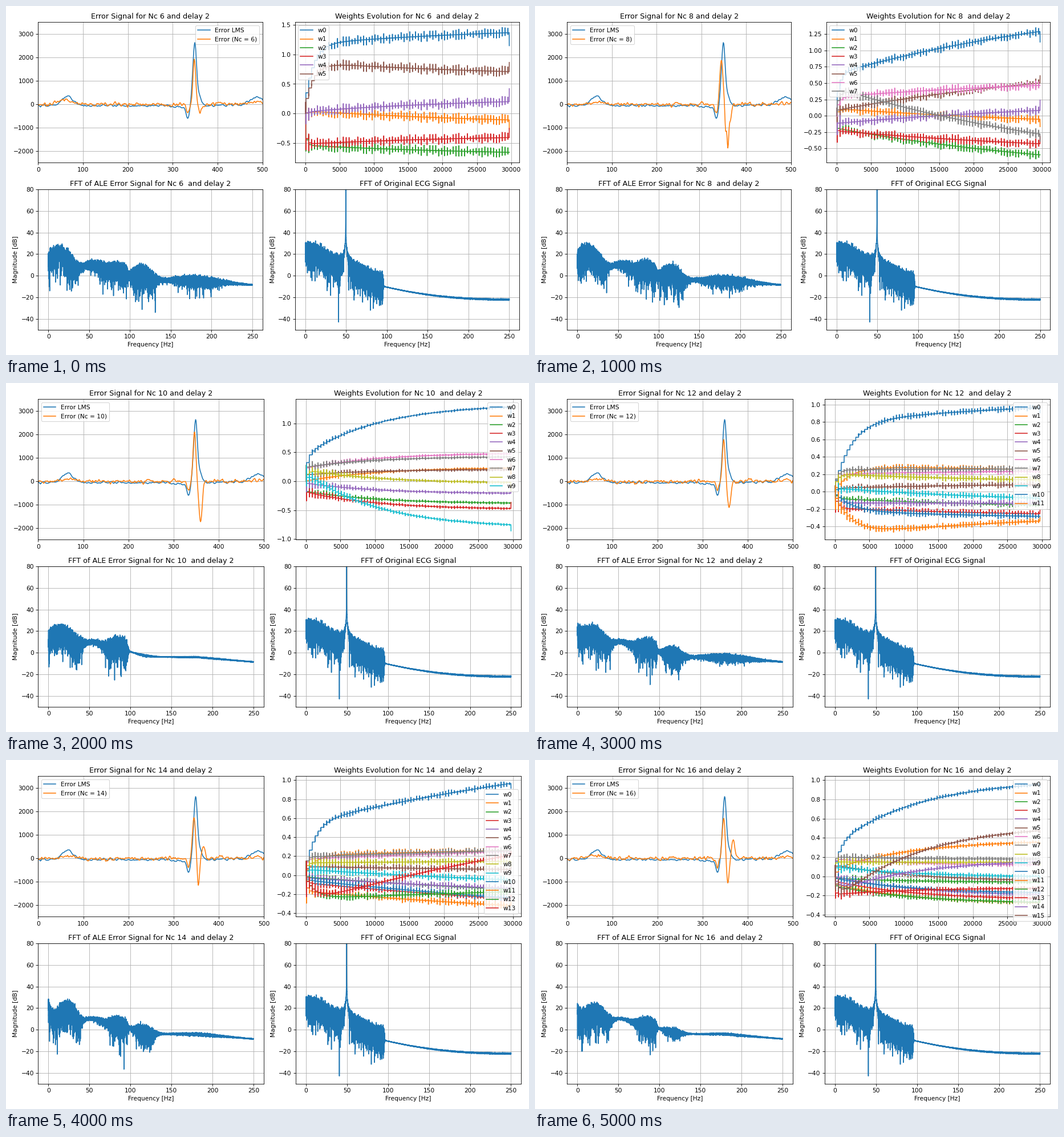
These frames come from a looping animation (917 px wide and 611 px high, 6 s). A matplotlib script:

```python
import numpy as np
import matplotlib.pyplot as plt
from matplotlib.animation import FuncAnimation

W, H, DPI = 917, 611, 76.4
N = 29730        # samples in the recording
BEAT = 421       # samples between heartbeats
X = np.arange(501)
FREQ = np.linspace(0, 250, 15001)

fig = plt.figure(figsize=((W + .01) / DPI, (H + .01) / DPI), dpi=DPI)
scenes = []


def scene(**kw):
    scenes.append(kw)


def bump(x, center, height, width):
    return height * np.exp(-((x - center) / width) ** 2)


def step(x, edge, width):
    """Soft switch from 0 to 1."""
    return .5 + .5 * np.tanh((x - edge) / (2 * width))


def ripple(seed, size, width):
    rng = np.random.default_rng(seed)
    kernel = bump(np.arange(-10, 11), 0, 1, width)
    y = np.convolve(rng.normal(size=540), kernel, "same")[20:521]
    return size * y / y.std()


def amp(db):
    return 10 ** (db / 20)


def spectrum(seed, steady, spread):
    """Magnitude in dB of a steady part plus complex noise."""
    rng = np.random.default_rng(seed)
    z = rng.normal(size=FREQ.size) + 1j * rng.normal(size=FREQ.size)
    return 20 * np.log10(np.abs(steady + spread * z / np.sqrt(2)) + 1e-4)


def ecg_spectrum():
    hum = 27 - 22 * np.log10(np.maximum(np.abs(FREQ - 49.6), .002))
    tail = -22 + 12 * ((250 - FREQ) / 153) ** 2.3
    noise = .6 + bump(FREQ, 0, 17, 26) + bump(FREQ, 45, 2, 25)
    noise = noise * (1 - step(FREQ, 95.5, .25)) + .004
    return spectrum(4, amp(np.where(FREQ > 97, tail, hum)), noise)


def ale_spectrum(s):
    steady = (6 - 10 * step(FREQ, 100, 10) + bump(FREQ, 52, 4.5, 15)
              - 4.5 * np.clip((FREQ - 180) / 70, 0, 1))
    hum, mid, high, far = s["bands"]
    noise = (bump(FREQ, *s["low"]) + s["dc"] * np.exp(-FREQ / 3) + bump(FREQ, 58, hum, 14)
             + bump(FREQ, 85, mid, 14) * (1 - step(FREQ, 97, .7))
             + bump(FREQ, 115, high, 13) + bump(FREQ, 180, far, 35) + .01)
    return spectrum(s["nc"], amp(steady), noise)


def weight_path(s, k):
    """Fast rise to one level, slow drift to the next, a kick at every beat."""
    nc = s["nc"]
    beats = np.arange(60, N - 100, BEAT)
    t = np.append(beats, N) - 60
    a, b = s["begin"][k] / 100, s["final"][k] / 100
    outer = k < 2 or k >= nc - 2
    fast = s["fast"] * (1 if outer else .2)
    drift = (1 - np.exp(-t / s["slow"])) / (1 - np.exp(-N / s["slow"]))
    value = a * (1 - np.exp(-t / fast)) + (b - a) * drift

    rng = np.random.default_rng(nc)
    first, last = s["kick"]
    size = last + (first - last) * np.exp(-beats / 7000)
    size = size * (1 + 2.5 * np.exp(-beats / 350))
    up, down = rng.uniform(.3, 1.1, (2, beats.size)) * size
    px = (beats[:, None] + [0, 6, 14, 24]).ravel()
    py = np.stack([value[:-1], value[:-1] + up, value[1:] - down, value[1:]], 1).ravel()
    end = b - s["end"] * np.cos(np.pi * k / 4)
    return np.append(px, [N - 10, N]), np.append(py, [b, end])


def lms_signal():
    y = -55 + bump(X, 65, 400, 17) + bump(X, 487, 370, 20) + bump(X, 322, -70, 25)
    y += bump(X, 333.5, -520, 5) + bump(X, 358, 400, 7)
    return y + bump(X, 349, 2600, np.where(X < 349, 6.3, 5.5)) + ripple(1, 24, 2.4)


def error_signal(s):
    y = -10 + bump(X, 62, s["wave"], 24) + bump(X, 485, .7 * s["wave"], 18)
    y += bump(X, 333, -370, 4.5) + bump(X, 403, 80, 6)
    for part in s["pulse"]:
        y += bump(X, *part)
    return y + ripple(7 + s["nc"] // 4, 36, 1.7)


scene(nc=6, left=(56.4, 506.9), width=393.4, ylim=(-.835, 1.548),
      places=("upper right", "upper left"), wave=170,
      pulse=[(348, 1980, 4.2), (360, -350, 3.5), (365, -150, 6)],
      low=(12, 12, 16), dc=0, bands=(1.3, 1.6, 1.4, .24),
      fast=1200, slow=30000, kick=(.085, .085), end=.22,
      begin=[117, 5, -54, -52, 3, 87],
      final=[137, -11, -66, -41, 20, 71])

scene(nc=8, left=(56.4, 511), width=392.4, ylim=(-.72, 1.434),
      places=("upper left", "upper left"), wave=70,
      pulse=[(344.5, 1900, 5), (354, -1050, 2.2), (359, -1850, 3), (365, -700, 3.5)],
      low=(12, 14, 15), dc=0, bands=(1.1, 2.2, 1.5, .24),
      fast=500, slow=40000, kick=(.07, .07), end=.16,
      begin=[64, 11, -19, -23, -12, 8, 29, 43],
      final=[129, -5.5, -60, -43, 8, 50, 46.5, -28])

scene(nc=10, left=(56.4, 507.9), width=395.5, ylim=(-1.007, 1.415),
      places=("upper left", "upper right"), wave=80,
      pulse=[(346.5, 2120, 4.4), (360, -1760, 5.2)],
      low=(14, 10, 18), dc=0, bands=(.5, 2.4, .05, .02),
      fast=400, slow=10500, kick=(.085, .02), end=.15,
      begin=[44, 0, -17, -18, -3, 11, 22, 24, 20, 16],
      final=[128, 22.5, -37.5, -47, -20.5, 20, 47.5, 42, -2, -75])

scene(nc=12, left=(56.4, 507.9), width=395.5, ylim=(-.5526, 1.0625),
      places=("upper left", "upper right"), wave=100,
      pulse=[(347, 1800, 4.2), (359, -1110, 5)],
      low=(16, 9.5, 17), dc=9, bands=(.5, 2, .7, .17),
      fast=2400, slow=30000, kick=(.045, .035), end=.06,
      begin=[79, 30, -8, -19, -13, 4, 20, 25, 20, 4, -22, -51],
      final=[96.5, 25.5, -15.5, -25.5, -13.5, 8, 23.5, 26, 13.5, -7.5, -28.5, -34])

scene(nc=14, left=(56.4, 507.9), width=395.5, ylim=(-.437, 1.042),
      places=("upper left", "lower right"), wave=100,
      pulse=[(345.5, 1750, 5), (355, -1150, 4), (366, 500, 5.5)],
      low=(22, 11, 12), dc=12, bands=(.5, 1.6, .6, .06),
      fast=1400, slow=60000, kick=(.05, .035), end=.05,
      begin=[55, 21, -2, -8, -3, 9, 17, 19, 13, 6, -5, -17, -25, -29],
      final=[96.5, 26, -15, -25, -14, 6, 25, 26, 14.5, -5, -24, -32, -17.5, 21])

scene(nc=16, left=(56.4, 507.9), width=395.5, ylim=(-.42, 1.042),
      places=("upper left", "upper right"), wave=110,
      pulse=[(347, 1750, 4.7), (356, -1100, 4.5), (368, 820, 5)],
      low=(20, 8.5, 14), dc=7, bands=(.3, 1.5, .3, .04),
      fast=800, slow=12000, kick=(.05, .02), end=.03,
      begin=[32, 8, -2, -5, 0, 12, 18, 20, 15, 10, -2, -8, -10, -19, -16, -27],
      final=[95.5, 35.5, -6, -23, -19, -4, 12, 18, 14.5, 0, -17, -27.5, -27, -12.5, 15, 47.5])


LMS = lms_signal()
ECG = ecg_spectrum()


def panel(s, col, bottom, title, xlim, ylim):
    ax = fig.add_axes([s["left"][col] / W, 1 - bottom / H, s["width"] / W, 245.8 / H])
    ax.set(title=title, xlim=xlim, ylim=ylim)
    ax.grid(True)
    return ax


def spectrum_panel(s, col, title, db):
    ax = panel(s, col, 566.8, title, (-12.5, 262.5), (-50, 80))
    ax.set(xlabel="Frequency [Hz]", ylabel="Magnitude [dB]")
    ax.plot(FREQ, db)


def draw(i):
    fig.clear()
    s = scenes[i]
    nc = s["nc"]

    ax = panel(s, 0, 274.2, f"Error Signal for Nc {nc} and delay 2", (0, 500), (-2500, 3500))
    ax.plot(X, LMS, label="Error LMS")
    ax.plot(X, error_signal(s), label=f"Error (Nc = {nc})")
    ax.legend(loc=s["places"][0])

    ax = panel(s, 1, 274.2, f"Weights Evolution for Nc {nc}  and delay 2",
               (-.05 * N, 1.05 * N), s["ylim"])
    for k in range(nc):
        ax.plot(*weight_path(s, k), label=f"w{k}")
    ax.legend(loc=s["places"][1])

    spectrum_panel(s, 0, f"FFT of ALE Error Signal for Nc {nc}  and delay 2", ale_spectrum(s))
    spectrum_panel(s, 1, "FFT of Original ECG Signal", ECG)
    return []


anim = FuncAnimation(fig, draw, frames=len(scenes), interval=1000, repeat=True)
plt.show()
```
